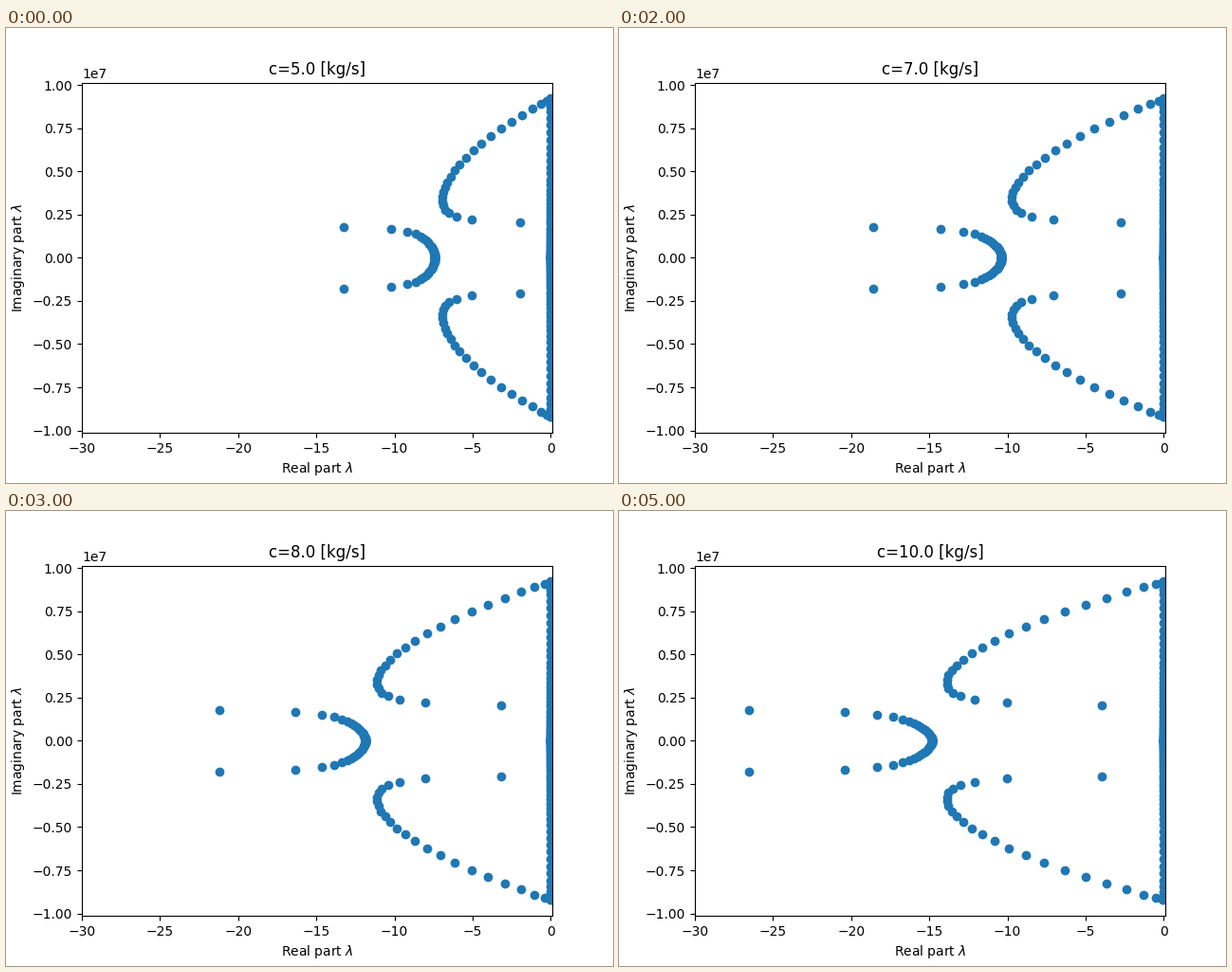
A matplotlib script for the animation above (6 s loop, 640 by 480 pixels).

```python
import numpy as np
import matplotlib.pyplot as plt
from matplotlib.animation import FuncAnimation

# Simply supported aluminium beam, cubic finite elements, one damper at midspan
E, RHO = 70e9, 2700.0
LENGTH, WIDTH, HEIGHT = 1.0, 0.005, 0.05
N = 50

area = WIDTH * HEIGHT
mass = RHO * area * LENGTH
step = LENGTH / N
unit = np.sqrt(E / RHO) * HEIGHT / np.sqrt(12) / step**2  # rad/s


def beam_modes():
    """Frequencies and decay rates per unit of damping."""
    # pure rotation modes with wave numbers 0 and pi
    freq = [np.sqrt(2520), np.sqrt(120)]
    rate = [0.0, 0.0]
    for n in range(1, N):
        c, s = np.cos(n * np.pi / N), np.sin(n * np.pi / N)
        K = np.array([[24 * (1 - c), -12 * s], [-12 * s, 8 + 4 * c]])
        M = np.array([[312 + 108 * c, 26 * s], [26 * s, 8 - 6 * c]]) / 420
        vals, vecs = np.linalg.eig(np.linalg.solve(M, K))
        for val, v in zip(vals.real, vecs.real.T):
            freq.append(np.sqrt(val))
            # even modes have a node at the damper
            rate.append(n % 2 * v[0] ** 2 / (v @ M @ v) / mass)
    return unit * np.array(freq), np.array(rate)


freq, rate = beam_modes()
imag = np.concatenate([freq, -freq])
decay = np.concatenate([rate, rate])

fig, ax = plt.subplots(figsize=(6.4, 4.8), dpi=100)
dots, = ax.plot(-5 * decay, imag, "o", color="#1f77b4")
ax.set_xlim(-30, 0.1)
ax.set_ylim(-1.1 * freq.max(), 1.1 * freq.max())
ax.set_xlabel(r"Real part $\lambda$")
ax.set_ylabel(r"Imaginary part $\lambda$")
title = ax.set_title("")


def draw(i):
    c = 5.0 + i
    dots.set_data(-c * decay, imag)
    title.set_text(f"c={c:.1f} [kg/s]")
    return dots, title


anim = FuncAnimation(fig, draw, frames=6, interval=1000, repeat=True,
                     repeat_delay=0, blit=False)
plt.show()
```
